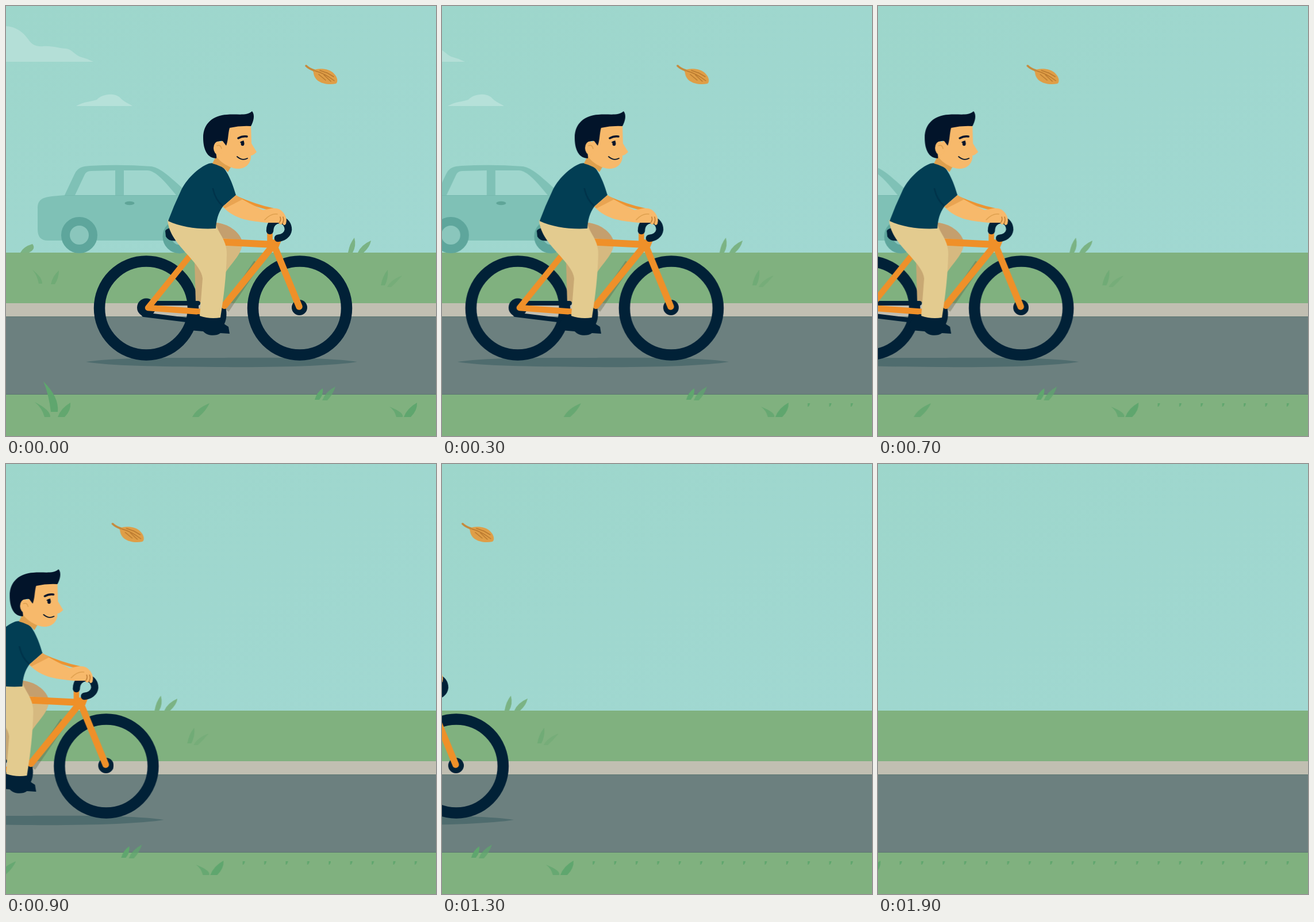
Write an HTML page that moves like this. It is 748 px wide and 748 px high and loops after 2 s.

```html
<!DOCTYPE html>
<html lang="en">
<head>
<meta charset="utf-8">
<title>Bicycle ride</title>
<style>
  html, body { margin: 0; width: 100%; height: 100%; overflow: hidden; background: #9fd7ce; }
  svg { display: block; width: 100%; height: 100%; }
  #world { animation: pass 2s steps(20) infinite; }
  @keyframes pass { to { transform: translateX(-748px); } }
  .line { fill: none; stroke-linecap: round; stroke-linejoin: round; }
  .dark { fill: #012137; }
  .frame { stroke: #ef9029; }
  .skin { fill: #f7b96b; }
</style>
</head>
<body>
<svg viewBox="0 0 748 748">
  <defs>
    <linearGradient id="sky" x2="1" y2="1">
      <stop stop-color="#9dd6cb"/>
      <stop offset="1" stop-color="#a1d8d2"/>
    </linearGradient>
    <g id="wheel">
      <circle r="81.5" fill="none" stroke="#012137" stroke-width="19.5"/>
    </g>
  </defs>

  <rect width="748" height="430" fill="url(#sky)"/>
  <rect y="429" width="748" height="88" fill="#80b17f"/>
  <rect y="517" width="748" height="23" fill="#c1bfb2"/>
  <rect y="540" width="748" height="136" fill="#6c807f"/>
  <path d="M0 540.5H748M0 675.5H748" stroke="#5b7671"/>
  <rect y="676" width="748" height="72" fill="#80b17f"/>

  <g id="world">
    <!-- clouds -->
    <path fill="#b4dfd7" d="M0 35C18 36 30 46 38 57C45 68 53 71 65 70C82 69 92 74 104 74C114 75 119 84 128 88Q140 91 152 97H0Z"/>
    <path fill="#b6e1d9" d="M122 174C136 166 146 167 158 163C166 153 188 150 198 159C205 167 213 169 220 174Z"/>

    <!-- leaf -->
    <path fill="#df9e47" d="M533 112C544 107 563 109 570 117C577 124 578 132 574 135C562 138 544 135 538 125C534 119 536 115 533 112Z"/>
    <path class="line" stroke="#c68a3c" stroke-width="3.5" d="M522 104Q527 109 536 112"/>
    <path class="line" stroke="#b9792f" stroke-width="1.5" d="M538 113Q554 117 571 130M546 112L560 117M544 119L556 129M553 120L565 131M558 116L570 123"/>

    <!-- car -->
    <path fill="#7fc1b6" d="M55 352C55 338 62 333 80 331L102 329L119 293C124 282 131 279 146 278Q200 275 252 279C270 281 290 302 318 327H340V408H73C60 408 55 401 55 388Z"/>
    <path fill="#9fd6cd" d="M120 329L137 293Q140 287 148 287L190 286V329ZM205 286H246C260 286 277 306 296 329H205Z"/>
    <path d="M102 329.5H300" stroke="#76b9ae"/>
    <ellipse cx="215" cy="343" rx="8.5" ry="3.2" fill="#5fa598"/>
    <g fill="#8ac6bc" stroke="#5ea69c" stroke-width="15">
      <circle cx="127.500" cy="398.500" r="24"/>
      <circle cx="302" cy="401" r="22"/>
    </g>

    <g id="grass"></g>

    <!-- bicycle behind the rider -->
    <path fill="#4f6c6e" d="M139 619C190 611 300 612 380 612C470 611 570 612 611 619C570 626 470 629 370 628C260 627 180 626 139 619Z"/>
    <path stroke="#565c42" stroke-opacity=".36" stroke-width="13" d="M437 447L382 528"/>
    <use href="#wheel" x="244" y="525.500"/>
    <use href="#wheel" x="511" y="525.500"/>
    <path class="dark" d="M277 391Q281 385 291 387L303 407Q284 412 278 401Z"/>
    <path fill="#c8a873" d="M328 444L350 466L344 516H330Z"/>
    <path fill="#d6b980" d="M358 376C384 376 409 396 411 416C407 437 389 449 377 472L360 430Z"/>
    <path fill="#c49f6e" d="M364 377C387 378 405 393 410 407L376 404Z"/>
    <g class="line" stroke="#012137" stroke-width="8">
      <path d="M243 517L334 517M240 537L330 548"/>
    </g>
    <circle class="dark" cx="244" cy="524.500" r="16"/>
    <ellipse class="dark" cx="372" cy="536" rx="11.500" ry="23"/>
    <g class="line frame" stroke-width="10.500">
      <path d="M318 437L247 525L340 532"/>
      <path d="M365 410L466 415L380 521" stroke-width="12"/>
    </g>
    <circle class="dark" cx="510.500" cy="524.500" r="13.500"/>
    <path class="line frame" stroke-width="11.500" d="M469 423L510 523"/>

    <!-- leg and shoe -->
    <path class="dark" d="M334 536L373 540C376 552 382 555 387 558L389 570L373 569C365 575 350 574 343 566L320 564C312 561 315 544 334 536Z"/>
    <path fill="#e3cb8f" d="M281 372L364 383C376 400 385 415 384 433C383 470 379 505 373 542Q354 545 337 539L342 474C341 461 330 449 318 435C298 413 283 396 281 372Z"/>

    <!-- shirt -->
    <path fill="#023e54" d="M353 274C334 281 313 302 304 322Q292 347 282 374C305 385 338 389 365 387C366 372 369 360 377 349L400 329C394 309 386 287 373 276Q362 272 353 274Z"/>
    <path class="line" stroke="#01334a" stroke-width="2.500" d="M360 318Q364 337 377 348"/>

    <!-- head -->
    <path fill="#dfa04e" d="M366 260L396 272L386 289Q377 278 359 274Z"/>
    <path class="skin" d="M384 210L426 206L427 239L436 254Q430 260 426 260C427 273 417 284 402 283C389 282 372 272 365 260Z"/>
    <path fill="#02142a" d="M366 265C351 265 343 251 343 229C343 204 361 190 384 189C402 187 418 192 428 183C434 190 430 202 426 209Q407 208 389 212C386 222 387 233 383 243L377 235C368 233 362 241 363 250Q367 259 366 265Z"/>
    <ellipse class="skin" cx="369.500" cy="247" rx="8.500" ry="11.500"/>
    <path class="line" stroke="#dda04f" stroke-width="1.500" d="M367 243Q373 240 375 248"/>
    <ellipse cx="411.500" cy="239" rx="3" ry="4.300" fill="#02142a"/>
    <path class="line" stroke="#02142a" stroke-width="3.500" d="M404 230Q411 226 419 227"/>
    <path class="line" stroke="#02142a" stroke-width="1.800" d="M402 262Q411 270 420 265M408 237L413 235"/>

    <!-- handlebar and arms -->
    <path class="line frame" stroke-width="9.500" d="M459 393V409Q467 414 474 407"/>
    <path class="frame" fill="#ef9029" d="M455 408L478 409L472 424H459Z"/>
    <path class="line" stroke="#012137" stroke-width="12.500" stroke-linecap="butt" d="M459 391C459 378 468 372 476 372C487 373 491 382 491 389C490 398 482 403 473 404"/>
    <path class="line" stroke="#ec9432" stroke-width="5" d="M401 333Q432 347 464 354"/>
    <path class="skin" d="M400 329C412 338 433 348 447 355L462 352Q476 350 483 360Q490 370 487 379Q483 384 481 378Q477 383 474 377L454 377C428 374 399 373 377 349Z"/>
    <path fill="#e9a452" d="M400 329L412 336Q397 344 381 352L377 349Z"/>
    <path class="line" stroke="#b9772f" stroke-width="1.500" d="M475 377Q479 373 477 367M481 378Q484 373 482 367"/>
    <path class="line" stroke="#dea04f" stroke-width="1.500" d="M450 372Q461 360 472 362"/>
  </g>
</svg>
<script>
  const grass = document.getElementById('grass');

  function addPath(d, fill, opacity = 1) {
    const path = document.createElementNS('http://www.w3.org/2000/svg', 'path');
    path.setAttribute('d', d);
    path.setAttribute('fill', fill);
    path.setAttribute('opacity', opacity);
    grass.append(path);
  }

  // A blade from root to tip, bowed sideways, with its given width at the base.
  function blade(rootX, rootY, tipX, tipY, width, fill, opacity) {
    const midY = (rootY + tipY) / 2 - 3;
    const bend = rootX + (tipX - rootX) * 0.25;
    addPath(`M${rootX} ${rootY}Q${bend} ${midY} ${tipX} ${tipY}` +
      `Q${bend + width * 1.5} ${midY + 4} ${rootX + width} ${rootY}Z`, fill, opacity);
  }

  const pale = '#7bb384', deep = '#5fa66e';
  blade(25, 429, 46, 414, 15, pale);
  blade(595, 429, 606, 403, 8, pale);
  blade(612, 429, 635, 408, 10, pale);

  blade(57, 483, 46, 459, 6, deep, 0.5);
  blade(78, 484, 92, 460, 7, deep, 0.5);
  blade(652, 486, 664, 459, 7, deep, 0.5);
  blade(663, 489, 689, 469, 7, deep, 0.3);

  blade(78, 706, 65, 653, 12, deep);
  blade(67, 715, 50, 689, 10, deep, 0.8);
  blade(90, 715, 112, 690, 12, deep, 0.9);
  blade(324, 715, 354, 691, 11, deep, 0.75);
  blade(537, 685, 551, 665, 8, deep);
  blade(550, 686, 573, 662, 9, deep, 0.75);
  blade(679, 715, 667, 697, 11, deep, 0.75);
  blade(692, 715, 715, 690, 12, deep);

  for (let i = 0; i < 19; i++) {
    const x = 748.4 + i * 37.4;
    addPath(`M${x} 691h4q-1 4-3 6h-1Z`, deep);
  }
</script>
</body>
</html>
```
